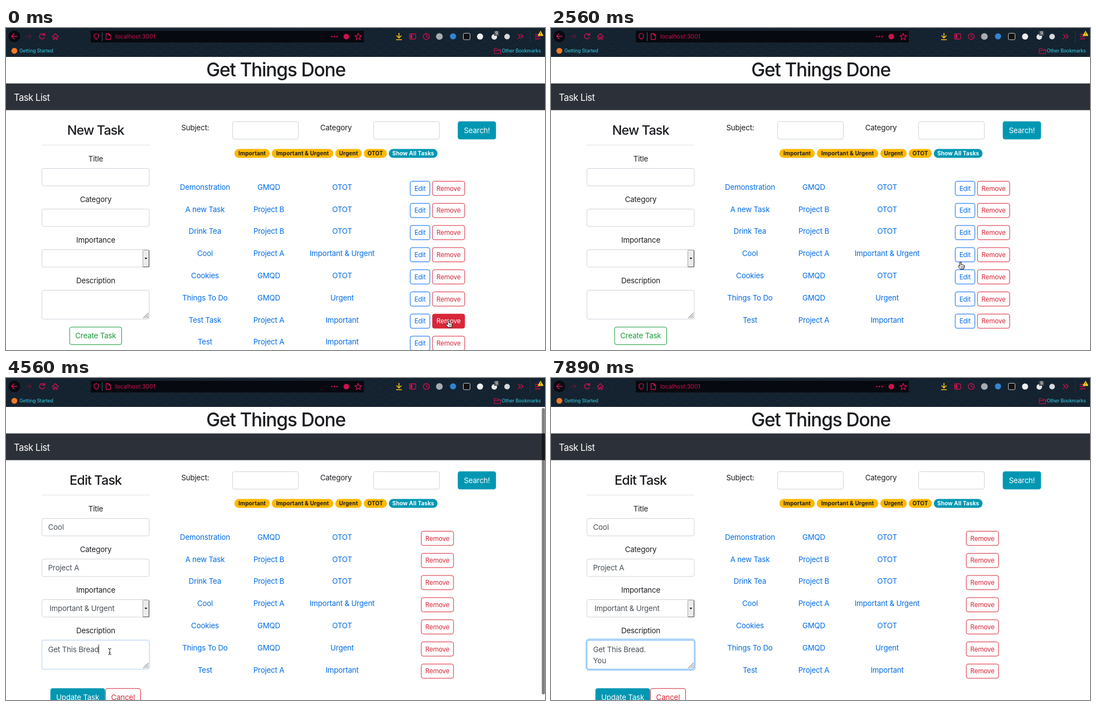
These frames come from a looping animation (967x579 px, 8000 ms). An HTML page with a canvas:

```html
<!DOCTYPE html>
<html lang="en">
<head>
<meta charset="utf-8">
<title>Get Things Done</title>
<style>
html, body { margin: 0; width: 100%; height: 100%; overflow: hidden; background: #fff; }
canvas { display: block; }
</style>
</head>
<body>
<canvas id="stage" width="967" height="579"></canvas>
<script>
const ctx = document.getElementById('stage').getContext('2d');
const LOOP = 8000;
const INK = '#1b1d21', BLUE = '#006be6', RED = '#d82738', GREEN = '#17993b',
      TEAL = '#0097b2', YELLOW = '#ffb800', PINK = '#d0104e', CYAN = '#2fb9cf',
      BORDER = '#ced4da', FIELD_INK = '#495057', BAR = '#13202d';

const tasks = [
  ['Demonstration', 'GMQD', 'OTOT'],
  ['A new Task', 'Project B', 'OTOT'],
  ['Drink Tea', 'Project B', 'OTOT'],
  ['Cool', 'Project A', 'Important & Urgent'],
  ['Cookies', 'GMQD', 'OTOT'],
  ['Things To Do', 'GMQD', 'Urgent'],
  ['Test Task', 'Project A', 'Important'],
  ['Test', 'Project A', 'Important']
];

// Stepped timelines: [start ms, ...values]
const cursorSteps = [
  [0, 'hand', 794, 526], [2440, 'hand', 768, 470], [2560, 'hand', 735, 421],
  [3000, 'hand', 739, 416], [3110, 'hand', 744, 411], [3560, 'arrow', 744, 411],
  [3890, 'arrow', 400, 470], [4000, 'beam', 184, 510], [4220, 'beam', 184, 502],
  [4330, 'beam', 186, 492], [5330, 'none', 0, 0]
];
const noteSteps = [
  [0, 'Get This Bread', ''], [5330, 'Get This Bread.', ''], [7440, 'Get This Bread.', 'Y'],
  [7670, 'Get This Bread.', 'Yo'], [7780, 'Get This Bread.', 'You']
];
// Caret line: 0 hidden, 1 or 2
const caretSteps = [
  [0, 0], [4560, 1], [5000, 0], [5330, 1], [5560, 2], [5670, 0], [5890, 2],
  [6220, 0], [6440, 2], [6780, 0], [7440, 2], [7890, 0]
];

const at = (steps, t) => steps.findLast(s => s[0] <= t).slice(1);
const ramp = (t, a, b) => Math.min(1, Math.max(0, (t - a) / (b - a)));

function text(str, x, midY, { size = 13.3, color = INK, align = 'center', weight = 400, track = -.012 } = {}) {
  ctx.font = `${weight} ${size}px Inter, "Open Sans", sans-serif`;
  ctx.letterSpacing = track * size + 'px';
  ctx.textAlign = align;
  ctx.fillStyle = color;
  ctx.fillText(str, x, midY + size * .364);
  return ctx.measureText(str).width;
}

function box(x, y, w, h, { fill, stroke, radius = 3.5, width = 1 } = {}) {
  ctx.beginPath();
  ctx.roundRect(x, y, w, h, radius);
  if (fill) { ctx.fillStyle = fill; ctx.fill(); }
  if (stroke) { ctx.strokeStyle = stroke; ctx.lineWidth = width; ctx.stroke(); }
}

function button(label, x, y, w, h, color, { size = 13.3, filled = 0 } = {}) {
  const draw = (fill, ink) => {
    box(x + .5, y + .5, w - 1, h - 1, { fill, stroke: color });
    text(label, x + w / 2, y + h / 2, { size, color: ink });
  };
  if (filled < 1) draw('#fff', color);
  if (filled > 0) {
    ctx.globalAlpha = filled;
    draw(color, '#fff');
    ctx.globalAlpha = 1;
  }
}

const field = (x, y, w, h, stroke = BORDER) => box(x + .5, y + .5, w - 1, h - 1, { fill: '#fff', stroke });

function shape(d, { x = 0, y = 0, fill, stroke, width = 1.3 }) {
  const path = new Path2D(d);
  ctx.save();
  ctx.translate(x, y);
  ctx.lineWidth = width;
  ctx.lineJoin = ctx.lineCap = 'round';
  if (fill) { ctx.fillStyle = fill; ctx.fill(path); }
  if (stroke) { ctx.strokeStyle = stroke; ctx.stroke(path); }
  ctx.restore();
}

function disc(x, y, r, fill, stroke, width = 1.2) {
  box(x - r, y - r, 2 * r, 2 * r, { fill, stroke, radius: r, width });
}

function toolbar() {
  ctx.save();
  ctx.beginPath();
  ctx.rect(0, 0, 967, 51.7);
  ctx.clip();
  ctx.fillStyle = BAR;
  ctx.fillRect(0, 0, 967, 52);
  for (let row = 0; row < 11; row++)
    for (let x = row % 2 * 11; x < 990; x += 22)
      for (let r = 11; r > 2; r -= 4) disc(x, row * 6, r, BAR, '#1a2b39', 1);
  ctx.restore();

  disc(15, 15, 11.5, '#090c12', '#27303a', 1);
  shape('M20 15H10M14.5 10.5L10 15L14.5 19.5', { stroke: PINK, width: 1.5 });
  shape('M35 15H45M40.5 10.5L45 15L40.5 19.5', { stroke: '#561a37', width: 1.5 });
  shape('M68.5 12A4.7 4.7 0 1 0 69 17M69.5 9.5V13H66', { stroke: PINK, width: 1.5 });
  shape('M83 15.5L88.5 10L94 15.5M84.8 14.5V20H87.3V16.5H89.7V20H92.2V14.5', { stroke: PINK });

  box(151.5, 4.5, 491, 22, { fill: '#06090f', stroke: '#1a222c', radius: 2 });
  shape('M162 10L166 11.5V14.5Q166 18 162 20.5Q158 18 158 14.5V11.5Z', { stroke: PINK });
  shape('M172.5 8V23', { stroke: '#16788a', width: 1 });
  shape('M179.5 10H184.5L187.5 13V20.5H179.5ZM184.5 10V13H187.5', { stroke: PINK });
  text('localhost:3001', 196, 15.5, { size: 10.5, color: PINK, align: 'left', track: 0 });
  for (const x of [584.5, 589.2, 594]) disc(x, 15.3, 1.4, PINK);
  disc(610.5, 15.5, 5, PINK);
  shape('M632 9.5L633.7 13.5L638 13.9L634.7 16.7L635.7 21L632 18.7L628.3 21L629.3 16.7L626 13.9L630.3 13.5Z', { stroke: PINK });

  shape('M705 9.5V17.5M701 14L705 18L709 14M700.5 21H709.5', { stroke: '#f3bd18', width: 1.7 });
  box(724, 10.5, 11, 9.5, { stroke: PINK, radius: 1.5, width: 1.3 });
  box(725.5, 12, 3.5, 6.5, { fill: PINK, radius: 0 });
  disc(754, 15.3, 5.3, null, PINK, 1.4);
  shape('M754 12.5V15.5L756.5 16.5', { stroke: PINK });
  disc(777.5, 15.3, 6, '#a8abb0');
  disc(802, 15, 5.5, '#3184d5');
  box(820.5, 9.5, 12, 11.5, { fill: '#111', stroke: '#c9ccd0', radius: 2 });
  disc(850.5, 15.3, 5.5, '#eceef0');
  disc(876, 16, 5, '#e4e6e9');
  box(875.5, 5, 9, 9, { fill: '#4a4f57', radius: 1.5 });
  text('9', 880, 9.5, { size: 7.5, color: '#fff' });
  disc(899, 15.5, 5, '#d6d9dc');
  shape('M919 11.5L922.8 15.3L919 19.1M924 11.5L927.8 15.3L924 19.1', { stroke: PINK, width: 1.4 });
  shape('M940.5 4V27', { stroke: '#213445', width: 1 });
  shape('M949.5 11.5H958M949.5 15.5H958M949.5 19.5H958', { stroke: PINK, width: 1.4 });
  shape('M959 6L963.3 13.5H954.7Z', { fill: '#ffd321', stroke: '#ffd321' });
  shape('M959 8V10.5M959 12.6V12.7', { stroke: '#4a3500', width: 1.1 });

  disc(15, 41, 5.3, '#f37a24');
  text('Getting Started', 24, 41.3, { size: 8.6, color: CYAN, align: 'left', weight: 500 });
  shape('M876 45.5V37H880L881.5 38.5H887.5V45.5ZM876 40.5H887.5', { stroke: PINK, width: 1 });
  text('Other Bookmarks', 959.5, 41.3, { size: 8.6, color: CYAN, align: 'right', weight: 500 });
}

function header() {
  text('Get Things Done', 484, 74.7, { size: 33.4, weight: 500, track: -.034 });
  ctx.fillStyle = '#2c3038';
  ctx.fillRect(0, 99.7, 967, 48);
  text('Task List', 14, 124.5, { size: 16.6, color: '#fff', align: 'left', track: -.03 });
}

function searchArea() {
  text('Subject:', 339.5, 179);
  field(406, 167.8, 119, 32.5);
  text('Category', 592, 179);
  field(659, 167.8, 119, 32.5);
  button('Search!', 810.5, 167.8, 68.6, 32.5, TEAL, { filled: 1 });
  const badges = [['Important', 410, 473], ['Important & Urgent', 477, 587], ['Urgent', 591, 638],
                  ['OTOT', 642, 683], ['Show All Tasks', 687, 774]];
  for (const [label, left, right] of badges) {
    const teal = right === 774;
    box(left - .2, 217.4, right - left + .4, 16.2, { fill: teal ? TEAL : YELLOW, radius: 8.1 });
    text(label, (left + right) / 2, 225.8, { size: 10, weight: 700, track: .01, color: teal ? '#fff' : INK });
  }
}

function taskTable(t, editing) {
  const rows = t < 1220 ? tasks : tasks.filter(task => task[0] !== 'Test Task');
  const removeHover = t < 1220 ? 1 : ramp(t, 1840, 2110) * (1 - ramp(t, 2380, 2540));
  const editHover = ramp(t, 2950, 3200);
  rows.forEach((cells, i) => {
    const y = 286 + i * 39.8, top = y - 11;
    cells.forEach((cell, c) => text(cell, [357, 471.5, 603][c], y, { color: BLUE }));
    if (!editing) button('Edit', 724.7, top, 36.3, 26.6, '#0069f2', { size: 11.7, filled: i === 3 ? editHover : 0 });
    button('Remove', editing ? 744.6 : 764.6, top, 58.8, 26.6, RED, { size: 11.7, filled: i === 6 ? removeHover : 0 });
  });
}

function noteField(t, editing) {
  const focus = ramp(t, 4545, 4670);
  if (focus) box(63.3, 469.8, 195, 55.4, { stroke: `rgba(0,123,255,${.27 * focus})`, radius: 5, width: 3 });
  field(64, 471, 193.5, 53);
  if (focus) field(64, 471, 193.5, 53, `rgba(110,178,255,${Math.min(1, focus * 3)})`);
  shape('M246.5 521.5L255.5 512.5M250 521.5L255.5 516M253.5 521.5L255.5 519.5', { stroke: '#555', width: 1 });
  if (!editing) return;

  const lines = at(noteSteps, t), [caretLine] = at(caretSteps, t);
  lines.forEach((line, i) => {
    const width = text(line, 75.5, 488 + 20.3 * i, { color: FIELD_INK, align: 'left' });
    if (caretLine === i + 1) {
      ctx.fillStyle = FIELD_INK;
      ctx.fillRect(Math.round(75 + width), 479 + 20 * i, 1, 17);
    }
  });
}

function taskForm(t, editing) {
  text(editing ? 'Edit Task' : 'New Task', 160.7, 183.3, { size: 23.4, weight: 500, track: -.038 });
  ctx.fillStyle = '#e2e2e2';
  ctx.fillRect(64, 210, 193.5, 1);
  const values = editing ? ['Cool', 'Project A', 'Important & Urgent'] : ['', '', ''];
  ['Title', 'Category', 'Importance', 'Description'].forEach((label, i) => {
    const y = 235.3 + 73 * i;
    text(label, 161, y);
    if (i > 2) return;
    field(64, 252 + 73 * i, 193.5, 32.4);
    text(values[i], i === 2 ? 78 : 75.5, y + 33, { color: FIELD_INK, align: 'left' });
  });
  box(245.5, 399.5, 11, 30, { fill: '#ececec', stroke: '#aaa', radius: 1 });
  shape('M246 429.5H256.5V400', { stroke: '#555', width: 1.2 });
  shape('M248.5 413H253.5L251 416Z', { fill: '#111' });
  noteField(t, editing);

  if (editing) {
    button('Update Task', 79.6, 557.8, 98, 32.5, TEAL, { filled: 1 });
    button('Cancel', 177.8, 557.8, 64.2, 32.5, RED);
  } else {
    button('Create Task', 113.7, 537.3, 94.3, 32.5, GREEN);
  }
}

function scrollbar(t) {
  ctx.globalAlpha = 1 - ramp(t, 4890, 5110);
  box(961.3, 54, 5.5, 515, { fill: 'rgba(0,0,0,.5)', radius: 2.7 });
  ctx.globalAlpha = 1;
}

function pointer(t) {
  const [kind, x, y] = at(cursorSteps, t);
  if (kind === 'hand') {
    shape('M-1.5 7V1Q-1.5 -.5 -.2 -.5Q1 -.5 1 1V4.5Q2.5 3.7 3.3 5Q4.7 4.5 5.1 5.7Q6.7 5.4 6.7 7V9Q6.5 10.8 5.3 12.5H-.5L-4.2 8.2Q-5 6.8 -3.6 6.3Q-2.5 6.2 -1.5 7Z',
      { x, y, fill: '#fff', stroke: '#000', width: 1 });
    shape('M1 7.5V10.5M2.8 7.5V10.5M4.5 7.5V10.5', { x, y, stroke: '#000', width: .6 });
  } else if (kind === 'arrow') {
    shape('M0 0V11L2.5 8.7L4.1 12.5L6 11.7L4.4 8H7.7Z', { x, y, fill: '#000', stroke: '#fff', width: 1 });
  } else if (kind === 'beam') {
    shape('M-2.5 -5.5Q0 -5.5 0 -4V4Q0 5.5 -2.5 5.5M2.5 -5.5Q0 -5.5 0 -4M0 4Q0 5.5 2.5 5.5M-1.3 2H1.3', { x, y, stroke: '#222', width: 1 });
  }
}

function frame(now) {
  const t = now % LOOP, editing = t >= 3670;
  ctx.fillStyle = '#fff';
  ctx.fillRect(0, 0, 967, 579);
  toolbar();
  header();
  searchArea();
  taskTable(t, editing);
  taskForm(t, editing);
  if (editing) scrollbar(t);
  pointer(t);
  requestAnimationFrame(frame);
}
requestAnimationFrame(frame);
</script>
</body>
</html>
```
